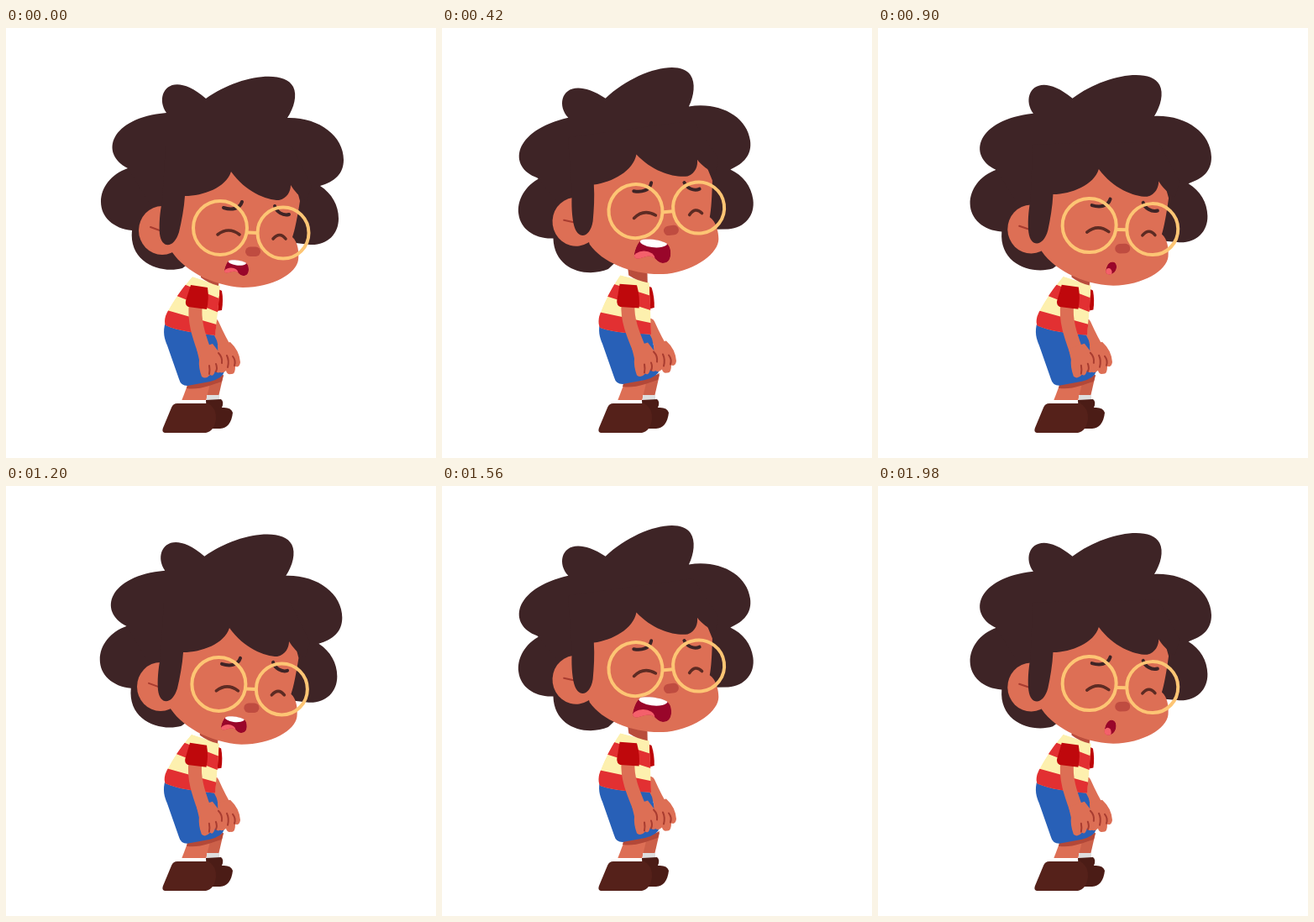
An HTML page with a canvas for the animation above (2.04 s loop, 512 px wide and 512 px high).

```html
<!DOCTYPE html>
<html lang="en">
<head>
<meta charset="utf-8">
<title>Crying child</title>
<style>
html, body { margin: 0; height: 100%; overflow: hidden; background: #fff; }
canvas { display: block; width: 100vw; height: 100vh; }
</style>
</head>
<body>
<canvas id="stage" width="512" height="512"></canvas>
<script>
const ctx = document.getElementById('stage').getContext('2d');
const HAIR = '#3e2426', SKIN = '#dd6f55', CREASE = '#a83c30', GOLD = '#fdc574', RED = '#e23032';
const LOOP = 2040, STEP = 60, CYCLE = 1080;
const HEAD = { x: 259.5, y: 177.5, turn: 7.7 * Math.PI / 180 };

const shape = {
  hair: `M145 167C111 150 123 107 191 101C176 80 195 47 238 84C275 57 331 48 342 70
    C347 80 343 95 335 107C372 106 402 128 402 157C402 174 391 183 374 188
    C388 197 396 211 396 227C396 246 382 259 362 258L345 256L290 250L190 240Z`,
  backHair: `M145 167C125 174 113 190 113 207C113 225 128 239 150 241
    C146 280 185 293 210 286L260 250L220 150Z`,
  face: `M205 160H338L350 206C347 225 344 240 341 249C348 255 349 268 348 276
    C346 292 318 309 282 309C245 307 208 287 195 262L190 230Z`,
  bangs: `M186 206C183 220 182 235 183 245C185 263 200 263 206 243C209 230 212 215 213 200
    C235 200 262 190 268 171C285 195 310 205 325 205C335 203 339 194 339 187
    C343 194 350 201 358 207L364 188L340 140H190Z`,
  shirt: `M222 296L255 307L252 340L249 366C225 363 205 361 190 354Q188 350 190 343
    C194 333 206 314 222 296Z`,
  sleeve: 'M220 306L240 309Q242 322 239 335L217 332Q213 330 214 325Z',
  farSleeve: 'M253 311L257 313Q259 324 257 336L251 337Z',
  neck: 'M232 288L255 290L253 307Q241 304 232 297Z',
  shorts: `M190 350C186 362 189 371 192 378L206 418Q208 426 216 426L243 421
    Q258 417 260 409L251 372L246 362Z`,
  nearLeg: 'M217 423L244 419L238 444H209Z',
  farLeg: 'M240 416L259 413L253 439H239Z',
  legShade: 'M216 425L244 420L259 413L257 421L242 426Q226 431 215 429Z',
  nearShoe: `M204 447H241Q251 453 250 466Q248 480 238 482H189Q185 481 187 476L197 452
    Q199 447 204 447Z`,
  farShoe: 'M238 443L256 442Q260 445 257 452Q268 451 270 458Q268 476 255 477H240Z',
  nearHand: `M227 382L246 376L256 389L257 406Q254 414 249 408Q247 416 243 413
    Q238 419 233 415Q229 404 230 395Z`,
  farHand: `M252 377L267 374Q278 384 279 398Q278 405 273 403Q273 413 268 412
    Q263 413 262 408Q256 413 253 408Z`,
  mouth: `M0 .65C.03 .4 .12 .03 .25 .02C.45 -.02 .75 .05 .88 .18C.97 .28 1 .4 1 .6
    C1 .85 .93 1 .78 1C.62 1 .58 .72 .42 .72C.28 .72 .18 .83 .08 .82C.02 .81 -.01 .74 0 .65Z`,
  smallMouth: `M0 .7C.05 .3 .3 -.02 .65 0C.98 .02 1.05 .35 .95 .6
    C.85 .85 .55 1.02 .3 1C.1 .98 -.02 .9 0 .7Z`
};
for (const key in shape) shape[key] = new Path2D(shape[key]);

// time, centre x, centre y, width, height
const mouthKeys = [
  [0, 274.5, 285.5, 29, 19], [240, 270, 286.5, 39, 25], [480, 268, 288, 45, 30],
  [660, 270.7, 288.4, 37, 28], [900, 280, 289.5, 13, 15], [1080, 275, 286, 26, 18],
  [1380, 270, 286.3, 38, 23], [1560, 268, 288, 46, 30], [1740, 268, 288.5, 47, 31],
  [1980, 279, 291, 14, 18]
];

function ease(u) {
  u = Math.min(1, Math.max(0, u));
  return u < .5 ? 4 * u ** 3 : 1 - 4 * (1 - u) ** 3;
}

function fill(path, color) {
  ctx.fillStyle = color;
  ctx.fill(path);
}

function line(d, color, width) {
  ctx.strokeStyle = color;
  ctx.lineWidth = width;
  ctx.stroke(new Path2D(d));
}

function oval(x, y, rx, ry, color, angle = 0) {
  ctx.beginPath();
  ctx.ellipse(x, y, rx, ry, angle, 0, 7);
  ctx.fillStyle = color;
  ctx.fill();
}

function ring(x, y, r) {
  ctx.beginPath();
  ctx.arc(x, y, r, 0, 7);
  ctx.strokeStyle = GOLD;
  ctx.lineWidth = 4;
  ctx.stroke();
}

// Draws with the canvas moved, then restores it.
function shifted(x, y, draw) {
  ctx.save();
  ctx.translate(x, y);
  draw();
  ctx.restore();
}

function drawLegs(lift) {
  fill(shape.farLeg, '#cc6049');
  fill(shape.nearLeg, SKIN);
  shifted(0, -2 * lift, () => fill(shape.legShade, '#b34838'));
  ctx.fillStyle = '#dedede';
  ctx.fillRect(239, 437, 15, 6);
  ctx.fillStyle = '#fff';
  ctx.fillRect(208, 443, 31, 5);
  fill(shape.farShoe, '#4b1c16');
  fill(shape.nearShoe, '#55211a');
}

function drawTorso(lift) {
  const leaning = draw => shifted(235, 366, () => {
    ctx.transform(1, -.08 * lift, .14 * lift, 1 + .04 * lift, 0, 0);
    ctx.translate(-235, -366);
    draw();
  });
  line('M247 352Q256 372 264 385', SKIN, 13);
  shifted(-lift, -2 * lift, () => fill(shape.shorts, '#2860b7'));
  leaning(() => {
    fill(shape.farSleeve, '#bd0508');
    ctx.clip(shape.shirt);
    fill(shape.shirt, '#fdf0ae');
    line('M200 309L260 333', RED, 16);
    line('M185 345L258 366', RED, 21);
  });
  leaning(() => fill(shape.neck, '#b94d3c'));
  shifted(0, -1.5 * lift, () => {
    fill(shape.farHand, SKIN);
    line('M263 390Q266 396 264 404M270 391Q274 396 272 402', CREASE, 2);
  });
  line(`M${226 - 4.5 * lift} 329C${223 - 3 * lift} 350 ${231 - lift} 370 238 390`, SKIN, 16);
  shifted(-lift, -1.5 * lift, () => {
    fill(shape.nearHand, SKIN);
    line('M242 402Q243 407 242 412M250 400Q252 405 250 409M253 387Q258 392 257 399', CREASE, 2);
  });
  leaning(() => fill(shape.sleeve, '#bf080c'));
}

function drawMouth(time, turn) {
  const i = mouthKeys.findLastIndex(key => key[0] <= time);
  const from = mouthKeys[i], to = mouthKeys[i + 1] || from;
  const mix = to === from ? 0 : (time - from[0]) / (to[0] - from[0]);
  const [, x, y, w, h] = from.map((value, n) => value + (to[n] - value) * mix);
  const open = w > 20, path = open ? shape.mouth : shape.smallMouth;
  shifted(x, y, () => {
    ctx.rotate(HEAD.turn * turn);
    ctx.scale(w, h);
    ctx.translate(-.5, -.5);
    ctx.clip(path);
    fill(path, '#99062a');
    oval(.27, .82, .3, .32, '#f4606b');
    if (open) oval(.53, .13, .38, .22, '#fff', .2);
  });
}

function drawHead(lift, turn, time) {
  ctx.rotate(-HEAD.turn * turn);
  ctx.translate(-HEAD.x, -HEAD.y);
  shifted(4 * lift, 0, () => fill(shape.backHair, HAIR));
  fill(shape.hair, HAIR);

  // The face slides up over the hair, its features further than its outline.
  const fringe = draw => shifted(-2.5 * lift, -16 * lift, draw);
  fringe(() => {
    oval(186, 241, 28, 29, SKIN);
    line('M172 237L183 241', CREASE, 2);
  });
  shifted(lift, -8 * lift, () => fill(shape.face, SKIN));
  fringe(() => {
    fill(shape.bangs, HAIR);
    line('M259 214C268 217 278 216 281 207M320 212C322 219 330 224 337 222', HAIR, 4);
  });
  shifted(.5 * lift, -16 * lift, () => {
    line('M252 246Q265 236 278 246M318 251Q326 242 333 251', '#5d2b23', 3.6);
    ctx.beginPath();
    ctx.roundRect(285, 260.5, 18, 11.5, 5.75);
    ctx.fillStyle = '#bf4c40';
    ctx.fill();
    drawMouth(time, turn);
    ring(255, 238, 32);
    ring(330, 244, 30.5);
    line('M288 243.5L299 244', GOLD, 4);
  });
}

function draw(now) {
  const time = Math.floor(now % LOOP / STEP) * STEP;
  const phase = time % CYCLE;
  const back = ease((phase - 540) / 540);
  const lift = ease(phase / 390) - back;
  const turn = ease((phase - 205) / 180) - back;
  ctx.clearRect(0, 0, 512, 512);
  ctx.lineCap = ctx.lineJoin = 'round';
  drawLegs(lift);
  drawTorso(lift);
  shifted(HEAD.x - 14.5 * lift - 16.5 * turn, HEAD.y - 2 * lift - 2 * turn,
    () => drawHead(lift, turn, time));
}

const start = performance.now();
function tick() {
  draw(performance.now() - start);
  requestAnimationFrame(tick);
}
tick();
</script>
</body>
</html>
```
